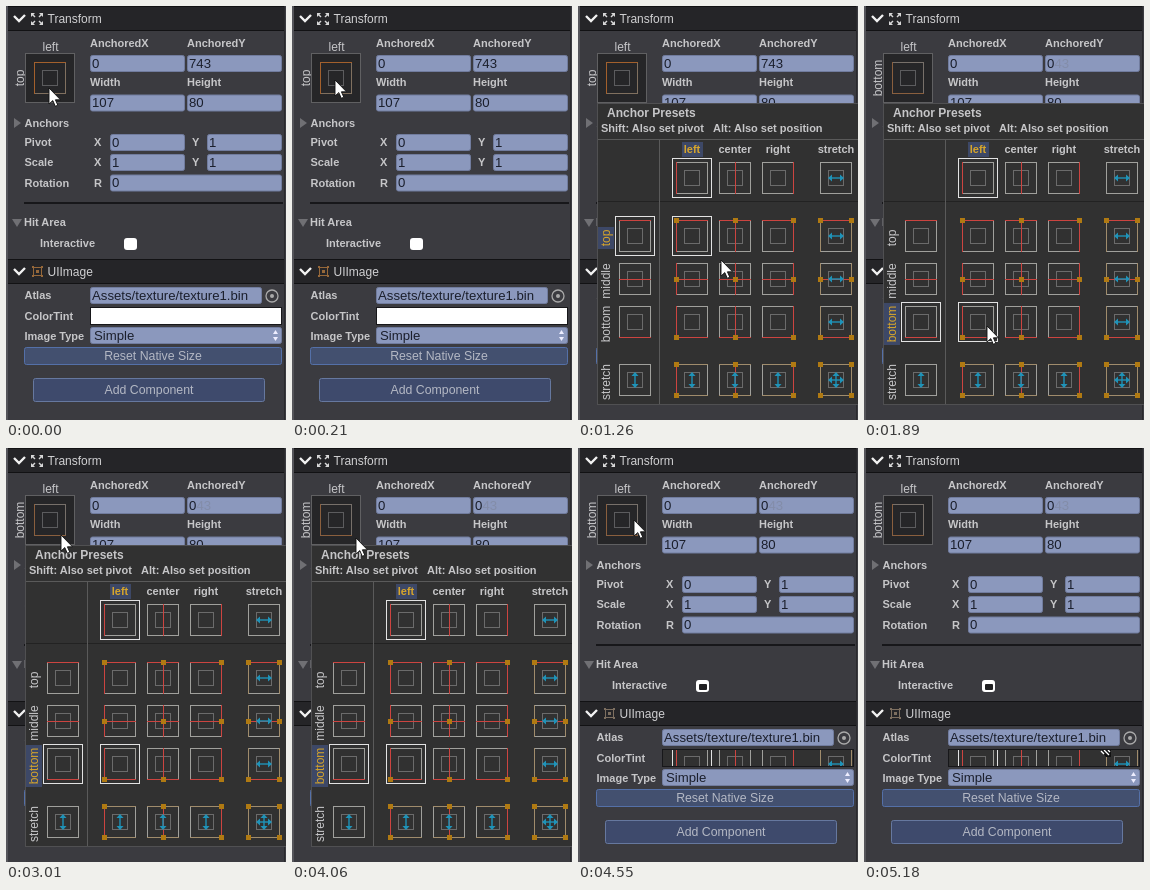
Recreate the animation shown at these times as an HTML page. Size 280 by 414 pixels, loop 5.6 s.

```html
<!DOCTYPE html>
<html>
<head>
<meta charset="utf-8">
<style>
html, body { margin: 0; width: 100%; height: 100%; overflow: hidden; background: #3b3b40; }
svg { display: block; }
text { font: 12px "Liberation Sans", Arial, sans-serif; fill: #c6c6c8; white-space: pre; }
text.b { font-weight: bold; font-size: 11px; }
text.h { font-weight: bold; }
text.v { font-size: 13.2px; fill: #1b1f2c; }
text.m { text-anchor: middle; }
text.big { font-size: 12.3px; fill: #b4b8c4; }
rect.crisp { shape-rendering: crispEdges; }
</style>
</head>
<body>
<svg width="280" height="414" viewBox="0 0 280 414">
  <g id="scene"></g>
  <path id="cursor" d="M0 0V16L3.8 12.6L6.3 18.3L8.8 17.2L6.4 11.8H11.5Z" fill="#fff" stroke="#111" stroke-width=".9"/>
</svg>
<script>
const LOOP = 5600, TICK = 70;
const OPEN = 560, PICK = 1890, CLOSE = 4550, TRAIL = 5040;
const RED = '#cc4440', GOLD = '#b07a12', BLUE = '#1f93b8', GREY = '#a0a09c', EDGE = '#a08c6c';

// cursor tip: time, x, y
const PATH = [
  [0, 43, 82], [210, 43, 74], [770, 43, 74], [1190, 147, 235], [1400, 136, 293],
  [1610, 123, 320], [2170, 123, 320], [2310, 114, 317], [2660, 114, 317],
  [3010, 55, 87], [3150, 54, 77], [3220, 54, 77], [3710, 114, 314],
  [3850, 114, 319], [4060, 64, 90], [4270, 20, 67], [4340, 30, 64],
  [4480, 56, 72], [4620, 56, 72], [4970, 232, 300], [5180, 281, 415], [LOOP, 281, 415]
];

const fill = (x, y, w, h, c, r = 0) =>
  `<rect x="${x}" y="${y}" width="${w}" height="${h}" rx="${r}" fill="${c}"${r ? '' : ' class="crisp"'}/>`;
const frame = (x, y, w, h, c, r = 0, inside = 'none') =>
  `<rect x="${x + .5}" y="${y + .5}" width="${w - 1}" height="${h - 1}" rx="${r}" fill="${inside}" stroke="${c}"/>`;
const path = (d, c, w = 1) => `<path d="${d}" fill="none" stroke="${c}" stroke-width="${w}"/>`;
const shape = (d, c) => `<path d="${d}" fill="${c}"/>`;
const text = (x, y, s, cls = '', c = '') =>
  `<text x="${x}" y="${y}" class="${cls}"${c && ` style="fill:${c}"`}>${s}</text>`;
const label = (x, y, s) => text(x, y, s, 'b');
const upright = (x, y, s, c) =>
  `<g transform="translate(${x} ${y}) rotate(-90)">${text(0, 0, s, 'm', c)}</g>`;
const field = (x, y, w, s, h = 17, pad = 2) =>
  frame(x, y, w, h, '#717c9e', 2, '#8b98bd') + text(x + pad, y + 12.5, s, 'v');
const button = (x, y, w, h, base, s, edge, c) =>
  frame(x, y, w, h, edge, 2, c) + text(x + w / 2, base, s, 'big m');
const header = (y, s) =>
  fill(2, y, 276, 25, '#252528') + fill(2, y, 276, 1, '#121214') + fill(2, y + 24, 276, 1, '#121214') +
  path(`M8 ${y + 10}l5 5l6 -6`, '#f2f2f2', 2.4) + text(41.5, y + 17, s, '', '#d0d0d2');

function panel(bottom, closed) {
  let s = fill(0, 0, 280, 414, '#3b3b40') + fill(0, 0, 2, 414, '#55555a') + fill(278, 0, 1, 414, '#2a2a2d');
  s += header(0, 'Transform') + header(253, 'UIImage');
  for (const [a, b] of [[-1, -1], [1, -1], [-1, 1], [1, 1]])
    s += shape(`M${31 + a * 6} ${13 + b * 6}h${-a * 4}l${a * 4} ${b * -4}z`, '#d8d8d8') +
      path(`M${31 + a * 2} ${13 + b * 2}l${a * 3} ${b * 3}`, '#d8d8d8', 1.4);
  const tone = closed ? '#7d6f60' : '#96683a';
  s += frame(27, 261, 9, 9, tone) + fill(30, 264, 3, 3, tone);
  for (const x of [26, 35]) for (const y of [260, 269]) s += fill(x, y, 2, 2, tone);

  // anchor widget
  s += text(44.5, 45, 'left', 'm') + upright(18, 72, bottom ? 'bottom' : 'top');
  s += frame(19, 47, 50, 50, '#606062', 0, '#262628') +
    frame(28, 56, 32, 32, bottom ? '#77706a' : '#80705f') + frame(36, 64, 16, 16, '#5c5c5e') +
    path(bottom ? 'M28.5 56V87.5H60' : 'M28.5 88V56.5H60', bottom ? '#8a5f3e' : '#a3602c');

  s += label(84, 41, 'AnchoredX') + label(181, 41, 'AnchoredY') + label(84, 80, 'Width') + label(181, 80, 'Height');
  s += field(84, 49, 95, '0') + field(181, 49, 95, bottom ? '0' : '743');
  if (bottom) s += text(190.5, 61.5, '43', 'v', '#838da9');
  s += field(84, 88.5, 95, '107') + field(181, 88.5, 95, '80');
  s += shape('M8 112l7 5l-7 5z', '#707074') + label(18.5, 121, 'Anchors');
  for (const [y, name, v] of [[128, 'Pivot', 0], [148, 'Scale', 1]])
    s += label(18.5, y + 12, name) + label(88, y + 12, 'X') + label(186, y + 12, 'Y') +
      field(104, y, 75, v) + field(201, y, 75, 1);
  s += label(18.5, 181, 'Rotation') + label(88, 181, 'R') + field(104, 168.5, 172, '0');
  s += fill(18, 196, 259, 2, '#17171a') + shape('M6 213h10l-5 8z', '#707074') + label(18, 220, 'Hit Area');
  s += label(34, 241, 'Interactive') + fill(118, 232, 13, 12, '#fff', 3);
  if (closed) s += fill(121, 236, 8, 6, '#202022', 1);

  s += label(18.5, 293, 'Atlas') + field(84, 281, 172, 'Assets/texture/texture1.bin');
  s += '<circle cx="266" cy="290" r="6" fill="none" stroke="#aaa" stroke-width="1.3"/><circle cx="266" cy="290" r="2" fill="#aaa"/>';
  s += label(18.5, 314, 'ColorTint') + fill(84, 301, 192, 18, '#17171a') + fill(85, 302, 190, 16, '#fff');
  s += label(18.5, 334, 'Image Type') + field(84, 321, 192, 'Simple', 17, 4);
  s += shape('M267 328l2.5 -4l2.5 4zM267 331h5l-2.5 4z', '#eef');
  s += button(18, 341, 258, 18, 354, 'Reset Native Size', '#5470a8', '#43506f');
  s += button(27, 372, 232, 24, 388, 'Add Component', '#66789f', '#3e4a6c');
  return s;
}

// name, position, place of the anchor along the axis (none: stretched)
const COLS = [['left', 98, 0], ['center', 141, .5], ['right', 184, 1], ['stretch', 242]];
const ROWS = [['top', 214, 0], ['middle', 257, .5], ['bottom', 300, 1], ['stretch', 358]];

const arrow = (x, y, turn) => `<g transform="translate(${x} ${y}) rotate(${turn})">` +
  path('M-7 0H7', BLUE, 1.4) + shape('M-8 0l4 -3.5v7zM8 0l-4 -3.5v7z', BLUE) + '</g>';

// one preset tile; col and row are optional axis definitions
function tile(x, y, col, row, picked) {
  let s = picked ? frame(x - 4, y - 4, 40, 40, '#e2e2e2') : '';
  s += frame(x, y, 32, 32, GREY) + frame(x + 8, y + 8, 16, 16, '#6b6b6b');
  const at = k => Math.round(k * 31);
  const stops = axis => axis[2] === undefined ? [0, 1] : [axis[2]];
  if (col && col[2] !== undefined) s += fill(x + at(col[2]), y, 1, 32, RED);
  if (row && row[2] !== undefined) s += fill(x, y + at(row[2]), 32, 1, RED);
  if (col && col[2] === undefined) {
    if (row) s += fill(x, y, 1, 32, EDGE) + fill(x + 31, y, 1, 32, EDGE);
    s += arrow(x + 16, y + 16, 0);
  }
  if (row && row[2] === undefined) {
    if (col) s += fill(x, y, 32, 1, EDGE) + fill(x, y + 31, 32, 1, EDGE);
    s += arrow(x + 16, y + 16, 90);
  }
  if (col && row)
    for (const a of stops(col)) for (const b of stops(row))
      s += fill(x + at(a) - 2, y + at(b) - 2, 5, 5, GOLD);
  return s;
}

function popup(bottom) {
  let s = fill(19, 97, 261, 302, '#313131') + frame(19, 97, 262, 302, '#505052');
  s += text(29, 111, 'Anchor Presets', 'h');
  s += label(23, 126, 'Shift: Also set pivot') + label(135, 126, 'Alt: Also set position');
  s += fill(20, 133, 260, 1, '#5a5a5a') + fill(20, 195, 260, 1, '#222') + fill(81, 134, 1, 264, '#5a5a5a');
  s += fill(104, 136, 21, 15, '#3d4867');
  const chosen = bottom ? 'bottom' : 'top', half = bottom ? 21 : 11;
  for (const col of COLS) {
    const on = col[0] === 'left';
    s += text(col[1] + 16, 147, col[0], 'b m', on ? '#d6a52c' : '') + tile(col[1], 156, col, null, on);
  }
  for (const row of ROWS) {
    const [name, y] = row, on = name === chosen, mid = y + 18;
    if (on) s += fill(20, mid - half, 16, half * 2, '#3d4867');
    s += upright(32, mid, name, on ? '#d6a52c' : '') + tile(41, y, null, row, on);
    for (const col of COLS) s += tile(col[1], y, col, row, on && col[0] === 'left');
  }
  return s;
}

// what stays in the tint field after the popup closes
const residue = trail =>
  `<clipPath id="tint"><rect x="85" y="302" width="190" height="16"/></clipPath><g clip-path="url(#tint)">${popup(true)}` +
  (trail ? shape('M236 301h11v8h-5z', '#111') + path('M237 303l3 3M240 302l5 5M244 302l2 2', '#fff', 1.4) : '') + '</g>';

function cursorAt(t) {
  const i = PATH.findIndex((p, n) => n && t <= p[0]);
  const [t0, x0, y0] = PATH[i - 1], [t1, x1, y1] = PATH[i];
  const k = (t - t0) / (t1 - t0);
  return [Math.round(x0 + (x1 - x0) * k), Math.round(y0 + (y1 - y0) * k)];
}

const scene = document.getElementById('scene'), cursor = document.getElementById('cursor');
let shown;
function draw(now) {
  const t = Math.floor(now % LOOP / TICK) * TICK;
  const stage = [OPEN, PICK, CLOSE, TRAIL].filter(c => t >= c).length;
  if (stage !== shown) {
    shown = stage;
    const bottom = stage > 1, closed = stage > 2;
    scene.innerHTML = panel(bottom, closed) +
      (closed ? residue(stage > 3) : stage ? popup(bottom) : '');
  }
  cursor.setAttribute('transform', `translate(${cursorAt(t)})`);
}
const start = performance.now();
function tick() {
  draw(performance.now() - start);
  requestAnimationFrame(tick);
}
tick();
</script>
</body>
</html>
```
